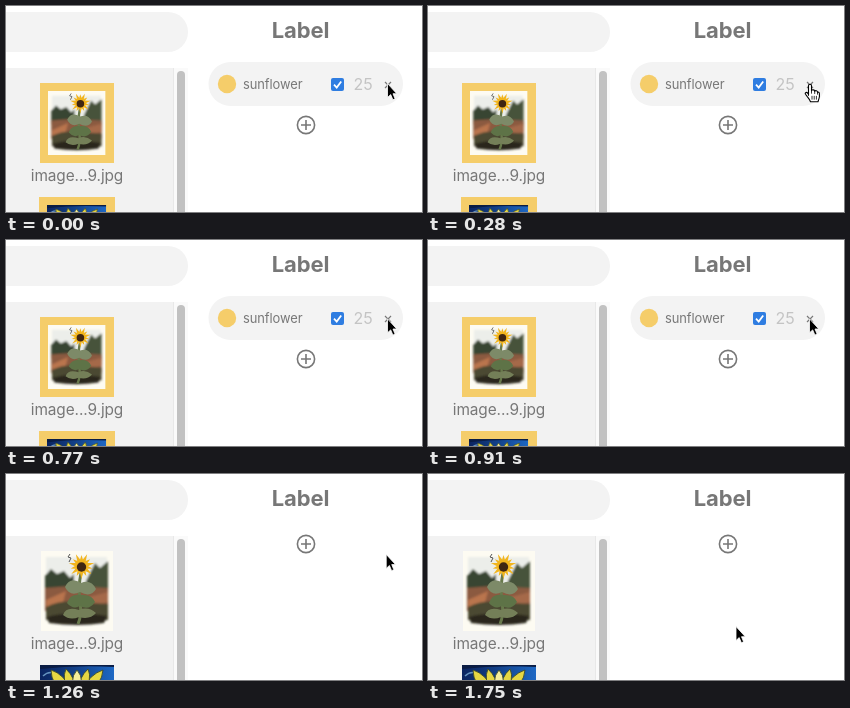
Animation, 416 px wide and 206 px high, one loop 1.82 s. Source, as an HTML page:

```html
<!DOCTYPE html>
<html lang="en">
<head>
<meta charset="utf-8">
<title>Removing a label</title>
<style>
  html, body { margin: 0; width: 100%; height: 100%; overflow: hidden; background: #fff; }
  svg { display: block; width: 416px; height: 206px; }
  text { font-family: Inter, Roboto, "Liberation Sans", sans-serif; fill: #777; letter-spacing: -.006em; }
</style>
</head>
<body>
<svg viewBox="0 0 416 206">
  <defs>
    <filter id="soft" x="-20%" y="-20%" width="140%" height="140%"><feGaussianBlur stdDeviation="1.3"/></filter>
    <filter id="fine"><feGaussianBlur stdDeviation=".5"/></filter>
    <linearGradient id="night">
      <stop offset="0" stop-color="#0b2460"/>
      <stop offset=".45" stop-color="#123f86"/>
      <stop offset="1" stop-color="#1e68c4"/>
    </linearGradient>
    <clipPath id="frame"><path d="M0 0H72V80H0Z"/></clipPath>
    <clipPath id="frame2"><path d="M0 0H74V80H0Z"/></clipPath>
  </defs>

  <rect x="-30" y="6" width="212" height="40" rx="20" fill="#f3f3f3"/>
  <path d="M0 62H168V206H0Z" fill="#f2f2f2"/>
  <path d="M168 62H182V206H168Z" fill="#fafafa"/>
  <path d="M167.5 62V206" stroke="#e8e8e8"/>
  <rect x="171" y="65" width="8" height="160" rx="4" fill="#c1c1c1"/>

  <g id="borders" fill="#f5cd6a">
    <path d="M34 77H108V157H34Z"/>
    <path d="M33 191H109V206H33Z"/>
  </g>

  <g id="garden">
    <g clip-path="url(#frame)">
      <path d="M0 0H72V80H0Z" fill="#fdfbf2"/>
      <g filter="url(#soft)">
        <path d="M5 6H66V69Q36 76 5 69Z" fill="#eceeea"/>
        <path d="M4 25L10 18L16 23L23 20L29 27L33 23V42H4Z" fill="#384530"/>
        <path d="M45 30L50 20L54 12L59 17L67 10V44H45Z" fill="#46533a"/>
        <path d="M4 37L30 35L67 37V60H4Z" fill="#8b5a41"/>
        <path d="M5 49L25 40L22 52L5 57Z" fill="#b9744d"/>
        <path d="M48 46L67 41V51L52 55Z" fill="#a5694a"/>
        <path d="M5 56Q20 49 34 51L67 53V69Q36 75 5 69Z" fill="#4c4a32"/>
        <path d="M6 66Q30 59 66 65L63 72Q36 76 8 72Z" fill="#2b281f"/>
      </g>
      <g filter="url(#fine)">
        <path d="M29 3L27 6L30 7L28 11" fill="none" stroke="#555" stroke-width="1"/>
        <path d="M40 22Q37 36 39 50T37 73" fill="none" stroke="#68794b" stroke-width="3"/>
        <path d="M40 32Q29 25 24 36Q29 46 39 41Q50 47 55 38Q50 28 40 32Z" fill="#7d8a68"/>
        <path d="M40 44Q29 42 26 52Q32 59 39 55Q48 60 54 51Q51 43 40 44Z" fill="#5e7347"/>
        <path d="M38 59Q25 55 22 64Q29 70 38 66Q49 69 55 62Q47 55 38 59Z" fill="#747f58"/>
        <g id="petals" transform="translate(40.5 15)" fill="#f2b51d"/>
        <circle cx="40.500" cy="16" r="4.700" fill="#3f2612"/>
      </g>
    </g>
  </g>

  <g id="lotus">
    <g clip-path="url(#frame2)">
      <path d="M0 0H74V80H0Z" fill="url(#night)"/>
      <path d="M0 0H74V2Q36 0 0 4Z" fill="#0a1c44"/>
      <path d="M3 11Q8 6 14 8" fill="none" stroke="#8cc0e6" stroke-width="1.5" opacity=".7"/>
      <g fill="#e6d743" stroke="#3c4a2c" stroke-width=".9">
        <path d="M27 30Q11 20 11 5Q24 9 32 26Z"/>
        <path d="M45 30Q62 20 63 5Q50 9 41 26Z"/>
        <path d="M30 30Q21 14 26 4Q35 12 37 28Z"/>
        <path d="M43 30Q53 14 48 4Q39 12 37 28Z"/>
        <path d="M37 30Q28 15 37 5Q46 15 37 30Z" fill="#f6ee9a"/>
      </g>
    </g>
  </g>
  <text x="71" y="175" font-size="15.4" text-anchor="middle">image...9.jpg</text>

  <text x="294.500" y="32" font-size="22" font-weight="700" text-anchor="middle">Label</text>
  <g id="label">
    <rect x="202.500" y="56" width="194.500" height="44" rx="22" fill="#f3f3f3"/>
    <circle cx="221" cy="78" r="9.2" fill="#f5cd6a"/>
    <text x="237" y="83" font-size="12.9">sunflower</text>
    <rect x="325" y="72" width="13" height="13" rx="2" fill="#2f7de1"/>
    <path d="M328 78.700L330.700 81.500L335.200 75.500" fill="none" stroke="#fff" stroke-width="1.8"/>
    <text x="347.500" y="84" font-size="16" style="fill:#c4c4c4">25</text>
    <path d="M379 76L385 82M385 76L379 82" stroke="#777" stroke-width="1.2"/>
  </g>
  <g id="add" fill="none" stroke="#777" stroke-width="1.6">
    <circle r="8.600"/>
    <path d="M-5 0H5M0 -5V5"/>
  </g>

  <g id="arrow">
    <path d="M0 .5V14.500L3.200 11.600L5.400 16.800L7.600 15.800L5.500 10.700H9.300Z" fill="#000" stroke="#fff" stroke-width=".8" stroke-linejoin="round"/>
  </g>
  <g id="hand" fill="#fff" stroke="#000" stroke-width="1.100" stroke-linejoin="round" stroke-linecap="round">
    <path d="M-1.500 11V1.500Q-1.500 0 0 0T1.500 1.500V6.500Q2 5.400 3.300 5.600T4.700 7Q5.300 6.200 6.400 6.500T7.500 8Q9.400 7.400 9.400 9.500V12.500Q9 14.500 8 17.500H.5Q-.5 15 -2.500 12.600L-4.500 10Q-5.200 8.700 -4 8.200T-1.500 10"/>
    <path d="M1.500 6.500V9M4.700 7V9.300M7.500 8V10M2 12V15M4.200 12V15M6.400 12V15" stroke-width=".8"/>
  </g>
</svg>
<script>
const LOOP = 1820, STEP = 70;
const HOVER = 70, LEAVE = 770, REMOVE = 980, DEPART = 1470, ARRIVE = 1750;
const $ = id => document.getElementById(id);
const mix = (a, b, u) => a + (b - a) * u;
const progress = (t, from, to) => Math.min(1, Math.max(0, (t - from) / (to - from)));
const place = (id, x, y, scale = 1) =>
  $(id).setAttribute("transform", `translate(${x} ${y}) scale(${scale})`);
const show = (id, on) => $(id).setAttribute("display", on ? "inline" : "none");

$("petals").innerHTML = Array.from({ length: 14 }, (_, i) =>
  `<path d="M-2.5 -3L0 -${i % 2 ? 13 : 11}L2.5 -3Z" transform="rotate(${i * 360 / 14})"/>`).join("");

function pointer(t) {
  if (t < REMOVE) {
    return [381.5, mix(77, 78.3, progress(t, 0, 490))];
  }
  if (t < DEPART) {
    const u = progress(t, REMOVE, DEPART - STEP) ** 2;
    return [mix(382, 378, u), mix(79, 81, u)];
  }
  const u = progress(t, DEPART, ARRIVE);
  const eased = u * u * (3 - 2 * u);
  return [mix(377, 308, eased), mix(81, 152, eased)];
}

function draw(time) {
  const t = Math.floor((time % LOOP) / STEP) * STEP;
  const labelled = t < REMOVE;
  const hovering = t >= HOVER && t < LEAVE;
  const [x, y] = pointer(t);

  show("label", labelled);
  show("borders", labelled);
  place("garden", labelled ? 42 : 35, labelled ? 85 : 77, labelled ? 0.8 : 1);
  place("lotus", labelled ? 41 : 34, labelled ? 199 : 191, labelled ? 0.8 : 1);
  place("add", 300, labelled ? 119 : 70);

  show("hand", hovering);
  show("arrow", !hovering);
  place("hand", x + 0.5, y + 0.5);
  place("arrow", x, y);
}

const start = performance.now();
function tick() {
  draw(performance.now() - start);
  requestAnimationFrame(tick);
}
tick();
</script>
</body>
</html>
```
